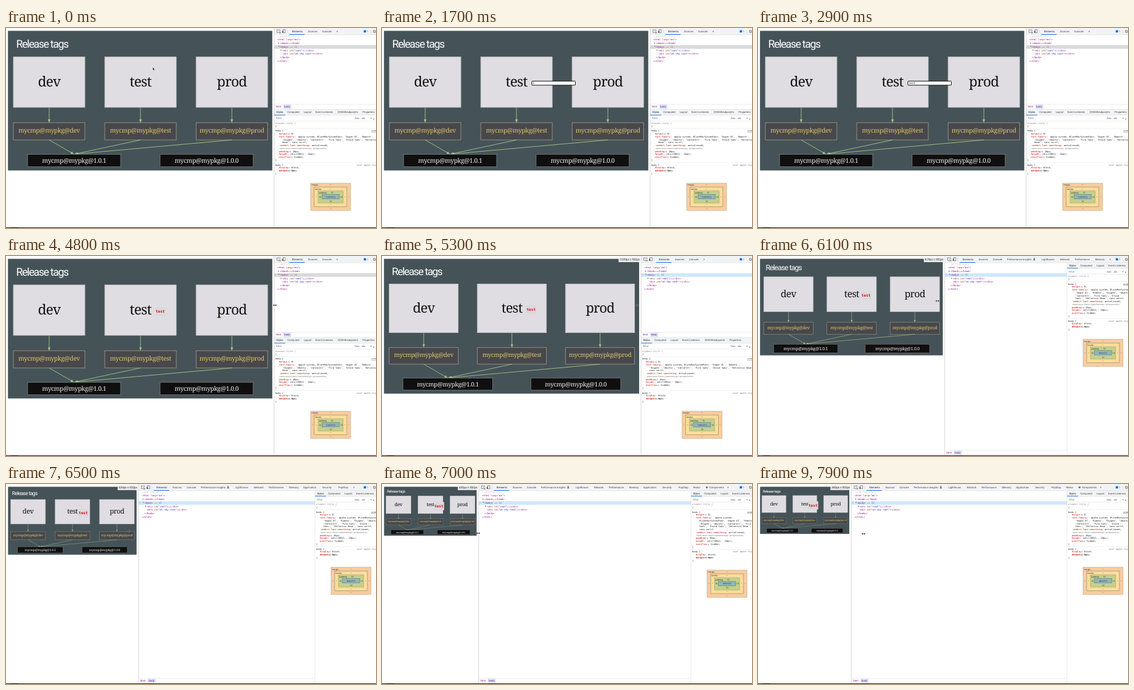
These frames come from a looping animation (600x325 px, 8 s). An HTML page:

```html
<!DOCTYPE html>
<html lang="en">
<head>
<meta charset="utf-8">
<title>Release tags</title>
<style>
html, body { margin: 0; width: 100%; height: 100%; overflow: hidden; background: #fff; }
svg { display: block; width: 600px; height: 325px; text-rendering: geometricPrecision; }
text { white-space: pre; }
.ui { font: 4.2px Roboto, sans-serif; fill: #444; }
.tree { font: 3.88px "DejaVu Sans Mono", monospace; fill: #881280; }
.css { font: 3.68px "DejaVu Sans Mono", monospace; fill: #222; }
.box { font: 3.5px Roboto, sans-serif; fill: #333; text-anchor: middle; }
.big { font: 500 22.6px "Noto Serif", serif; fill: #111; text-anchor: middle; letter-spacing: -.8px; }
.tag { font: 10.2px "Noto Serif", serif; text-anchor: middle; letter-spacing: -.35px; }
.title { font: 17.6px Roboto, sans-serif; fill: #fff; letter-spacing: -1.35px; }
.code { font: bold 6.1px "DejaVu Sans Mono", monospace; fill: #d3101c; }
</style>
</head>
<body>
<svg id="stage" viewBox="0 0 600 325"></svg>
<script>
const LOOP = 8000, STEP = 100, ZOOM = 0.3443;
const stage = document.getElementById('stage');

// time, divider x
const DIVIDER = [[5000, 434.8], [5300, 420], [5600, 393.6], [6100, 302.8], [6500, 215],
  [6800, 166], [7000, 156.8], [7500, 143], [7800, 145], [7900, 151.4]];
// time, pointer x, y
const POINTER = [[0, 238, 64], [200, 243.5, 89], [3600, 243.5, 89], [3800, 258, 87], [4100, 350, 80],
  [4300, 437, 78], [4400, 447, 79], [4500, 436, 80], [5000, 436, 80], [5300, 414, 80], [5600, 384, 80],
  [6100, 291, 73], [6500, 200, 77], [6800, 161, 80], [7000, 156, 80], [7500, 142, 80], [7800, 152, 81], [7900, 171, 81]];
// label, x from the divider, width
const TABS = [['Elements', 29, 18], ['Sources', 55, 15], ['Console', 78, 15], ['Performance insights', 101, 46],
  ['Lighthouse', 157, 21], ['Network', 187, 15], ['Performance', 211, 24], ['Memory', 244, 15],
  ['Application', 267, 22], ['Security', 298, 17], ['PopStop', 324, 16], ['Redux', 348, 12], ['Components', 374, 24]];
const SIDE_TABS = [['Styles', 3.5], ['Computed', 21.5], ['Layout', 48], ['Event Listeners', 67],
  ['DOM Breakpoints', 103.5], ['Properties', 143.5], ['Accessibility', 170]];
const TREE = [[5.3, '<html lang="en">'], [9.3, '<head>…</head>', '▸'], [9.3, '<body>', '▾'],
  [13.4, '<div id="root">…</div>', '▸'], [13.4, '<div id="wt-sky-root"></div>'], [9.3, '</body>'], [5.3, '</html>']];
const FAMILY = "-apple-system, BlinkMacSystemFont, 'Segoe UI', 'Roboto', 'Oxygen', 'Ubuntu', " +
  "'Cantarell', 'Fira Sans', 'Droid Sans', 'Helvetica Neue', sans-serif;";

function at(keys, t) {
  let i = keys.findIndex(k => k[0] > t);
  if (i < 0) return keys[keys.length - 1].slice(1);
  if (i === 0) return keys[0].slice(1);
  const a = keys[i - 1], b = keys[i], u = (t - a[0]) / (b[0] - a[0]);
  return a.slice(1).map((v, j) => v + (b[j + 1] - v) * u);
}

const esc = s => String(s).replace(/&/g, '&amp;').replace(/</g, '&lt;');
const rect = (x, y, w, h, fill, more = '') => `<rect x="${x}" y="${y}" width="${w}" height="${h}" fill="${fill}" ${more}/>`;
const raw = (cls, x, y, body, more = '') => `<text class="${cls}" x="${x}" y="${y}" ${more}>${body}</text>`;
const text = (cls, x, y, s, more) => raw(cls, x, y, esc(s), more);
const span = (s, fill, more = '') => `<tspan fill="${fill}" ${more}>${esc(s)}</tspan>`;
const line = (x1, y1, x2, y2, color = '#ccc', w = 0.4) =>
  `<path d="M${x1} ${y1}L${x2} ${y2}" stroke="${color}" stroke-width="${w}" fill="none"/>`;

function arrow(x1, y1, x2, y2) {
  const a = Math.atan2(y2 - y1, x2 - x1) * 180 / Math.PI;
  return line(x1, y1, x2, y2, '#a5c48d', 0.9) +
    `<path transform="translate(${x2} ${y2}) rotate(${a})" d="M0 0L-5 -2.2V2.2Z" fill="#a5c48d"/>`;
}

function slide(scale) {
  let s = rect(3.2, 4.6, 428.8, 227, '#455358') + text('title', 16.5, 32, 'Release tags');
  ['dev', 'test', 'prod'].forEach((name, i) => {
    const x = 12 + i * 148.2, mid = x + 58;
    s += rect(x, 47, 116, 82, '#dfdde1', 'stroke="#c4c8c9" stroke-width=".8"') + text('big', mid, 95, name);
    s += rect(x, 154, 116, 28, '#47484b', 'stroke="#a79b8d" stroke-width=".8"');
    s += text('tag', mid, 170, 'mycmp@mypkg@' + name, 'fill="#dfc36c"');
    s += arrow(mid, 129.5, mid, 153.5) + arrow(mid, 182, 110 + i, 205);
  });
  [35, 250].forEach((x, i) => {
    s += rect(x, 205.3, 151, 20.4, '#0f0f10', `stroke="${i ? '#8f7775' : '#7d8587'}" stroke-width=".8"`);
    s += text('tag', x + 75.5, 219.5, 'mycmp@mypkg@1.0.' + (1 - i), 'fill="#eee"');
  });
  return `<g transform="translate(3.4 4.4) scale(${scale}) translate(-3.4 -4.4)">${s}</g>`;
}

function toolbar(x) {
  let s = rect(x, 0, 600 - x, 11, '#f1f3f4') + line(x, 11, 600, 11);
  s += `<path d="M${x + 8} 7.5h-3.4v-4.6h5v2M${x + 7} 4.8l3.2 3.4m0-2.4v2.4h-2.4" fill="none" stroke="#555" stroke-width=".6"/>`;
  s += rect(x + 14.5, 2.8, 3.6, 5, 'none', 'stroke="#555" stroke-width=".6"') + rect(x + 13, 4.4, 2, 3.6, '#666');
  s += line(x + 21.5, 2.5, x + 21.5, 8.5);
  let more = x + 403;
  for (const [name, dx, w] of TABS) {
    if (x + dx + w > 566) { more = x + dx; break; }
    s += text('ui', x + dx, 7, name, dx === 29 ? 'style="fill:#222"' : '');
    if (name === 'Performance insights') s += `<path d="M${x + dx + 42.3} 7.2l1-3v-1.2h1.6v1.2l1 3z" fill="#777"/>`;
    if (name === 'Components') s += `<circle cx="${x + dx - 4}" cy="5.5" r="1.7" fill="#777"/>`;
  }
  s += text('ui', more, 7.2, '»', 'style="font-size:5.5px"') + rect(x + 24.5, 10, 25, 1, '#1a73e8');
  s += rect(580, 3.6, 4, 3.6, '#1a73e8', 'rx=".5"') + text('ui', 585.2, 7, '1', 'style="fill:#1a73e8"');
  s += line(591.5, 2.5, 591.5, 8.5);
  return s + '<circle cx="597.5" cy="5.5" r="1.7" fill="none" stroke="#555" stroke-width="1.1" stroke-dasharray=".9 .3"/>';
}

function tree(x, end, active) {
  let s = rect(x, 27.9, end - x, 5.9, active ? '#cfe8fc' : '#dadada');
  s += text('tree', x + 5.3, 14.6, '<!DOCTYPE html>', 'style="fill:#ccc"');
  TREE.forEach(([dx, code, mark], i) => {
    const y = 20.2 + i * 5.8;
    let body = esc(code).replace(/(\w+)=("[^"]*")/, (m, k, v) => span(k, '#994500') + '=' + span(v, '#1a1aa6'));
    if (mark === '▾') {
      body += span(' == $0', '#888', 'font-style="italic"');
      s += text('tree', x + 1.4, y - 0.3, '⋯', 'style="fill:#777"');
    }
    if (mark) {
      const d = mark === '▾' ? 'h2.2l-1.1 1.8z' : 'v2.4l1.8-1.2z';
      s += `<path d="M${x + dx - 2.8} ${y - 2.5}${d}" fill="#666"/>`;
    }
    s += raw('tree', x + dx, y, body);
  });
  return rect(x, 11, end - x, 4.6, '#fff') + s;
}

function crumbs(x, y, end) {
  return line(x, y - 4, end, y - 4) + rect(x + 15, y - 3.8, 12.8, 7.4, '#d5e4f7') +
    text('ui', x + 2.8, y + 1.3, 'html', 'style="fill:#881280"') + text('ui', x + 16.5, y + 1.3, 'body', 'style="fill:#881280"');
}

function wrap(words, limit) {
  const rows = [];
  let row = 'font-family:';
  for (const w of words) {
    if (row.length + w.length + 1 > limit) { rows.push(row); row = w; } else row += ' ' + w;
  }
  return [...rows, row];
}

function familyRows(left, wide, settled) {
  if (!wide) return wrap(FAMILY.split(' '), Math.floor((604 - left) / 2.25));
  const breaks = settled ? ['Blink', "'Oxygen", "Sans', 'Droid", 'sans-serif'] : ["'Segoe", "'Cantarell", "Sans', 'Helv"];
  let rest = 'font-family: ' + FAMILY;
  const rows = breaks.map(b => {
    const i = rest.indexOf(b), row = rest.slice(0, i).trimEnd();
    rest = rest.slice(i);
    return row;
  });
  return [...rows, rest];
}

function prop(x, y, name, value, state) {
  const off = state ? 'text-decoration="line-through"' : '';
  const sep = value[0] === '▸' ? ':' : ': ';
  return raw('css', x, y, span(name, state === 'bad' ? '#999' : '#c80000', off) +
    span(sep + value, state === 'bad' ? '#999' : '#222', off));
}

function boxModel(cx, y, size) {
  const layers = [[65, 44.5, '#f9cc9d', 'margin', '–'], [53, 32, '#fddd9b', 'border', '–'], [41, 20, '#c3d08b', 'padding', '10']];
  let s = '';
  layers.forEach(([w, h, fill, name, v], i) => {
    const top = y + i * 6.2, left = cx - w / 2;
    s += rect(left, top, w, h, fill, `stroke="#555" stroke-width=".4" ${i === 1 ? '' : 'stroke-dasharray="1 .7"'}`);
    s += text('box', left + 1.5, top + 4.4, name, 'style="text-anchor:start"');
    s += text('box', cx + (i === 2 ? 2 : 0), top + 4.4, v) + text('box', cx, top + h - 1.8, v);
    s += text('box', left + 3.2, y + 23.6, v) + text('box', left + w - 3.2, y + 23.6, v);
  });
  return s + rect(cx - 14, y + 18.6, 28, 7.2, '#8cb6c0', 'stroke="#555" stroke-width=".4"') +
    text('box', cx, y + 23.5, size);
}

function styles(x, top, wide, settled, size) {
  const right = 600, w = right - x, pitch = 4.74;
  let s = rect(x, top, w, 324 - top, '#fff') + rect(x, top, w, 9.6, '#f1f3f4');
  s += line(x, top, right, top) + line(x, top + 9.6, right, top + 9.6);
  for (const [name, dx] of SIDE_TABS) {
    if (x + dx + name.length * 1.9 > 600) break;
    s += text('ui', x + dx, top + 6.2, name, dx < 4 ? 'style="fill:#222"' : '');
  }
  s += rect(x, top + 8.8, 18, 0.9, '#1a73e8');
  s += text('ui', x + 3, top + 16, 'Filter', 'style="fill:#777"') + line(x, top + 19, right, top + 19);
  s += text('ui', 565.3, top + 16, ':hov') + text('ui', 576, top + 16, '.cls') + text('ui', 590.8, top + 16, '+');
  s += `<path d="M597 ${top + 16.6}v-2l-2 2z" fill="#666"/>`;

  let y = top + 23.6;
  const px = x + 8, name = x + 2;
  const next = () => (y += pitch);
  const gap = () => { s += line(x, y + 2.8, right, y + 2.8, '#ddd'); y += 7.8; };
  s += text('css', name, y, 'element.style {', 'style="fill:#888"') + text('css', name, next(), '}');
  gap();
  s += text('css', name, y, 'body {') + text('css', 592, y, 'index.css:1', 'text-decoration="underline" style="fill:#555"');
  s += prop(px, next(), 'margin', '▸ 0;');
  familyRows(px, wide, settled).forEach((row, i) => {
    s += i ? text('css', px + 5.5, next(), row) : prop(px, next(), 'font-family', row.slice(13));
  });
  s += prop(px, next(), '-webkit-font-smoothing', 'antialiased;');
  s += prop(px, next(), '-moz-osx-font-smoothing', 'grayscale;', 'bad');
  s += prop(px, next(), 'padding', '▸ 10px;');
  s += prop(px, next(), 'height', 'calc(100vh - 20px);');
  s += prop(px, next(), 'overflow', '▸ hidden;') + text('css', name, next(), '}');
  gap();
  s += text('css', name, y, 'body {') + text('css', 569, y, 'user agent stylesheet', 'font-style="italic" style="fill:#777"');
  s += prop(px, next(), 'display', 'block;') + prop(px, next(), 'margin', '▸ 8px;', 'off') + text('css', name, next(), '}');
  return s + boxModel((x + right) / 2 + 9, y + 14.3, size);
}

function overlay(t, w) {
  const h = w * 0.531;
  if (t >= 3200) {
    const x = 0.568 * w - 1.2, y = 6.6 + 0.367 * h;
    return rect(x, y - 6.7, 16.8, 13.4, '#dcd8db', 'rx="1"') + text('code', x + 1, y + 2.1, 'test');
  }
  if (t < 400) return '';
  const typed = 'test'.slice(0, [1700, 1800, 2200, 2300].filter(k => t >= k).length);
  return rect(243, 86.3, 70.5, 6.6, '#fff', `rx="1" stroke="#111" stroke-width="${t < 600 ? 0.6 : 1}"`) +
    text('css', 244.4, 91, typed, 'style="font-size:4.5px"') +
    (t >= 2300 && t < 2900 ? line(255.6, 87.6, 255.6, 91.8, '#222') : '');
}

function pointer(t) {
  if (t >= 500 && t < 3700) return '';
  const [x, y] = at(POINTER, t);
  const d = t < 4700 ? 'M0 0V4.6L1.1 3.6L1.9 5.3L2.7 4.9L1.9 3.3H3.3Z'
    : 'M-3.2 0L-1.2 -1.7V-.5H1.2V-1.7L3.2 0L1.2 1.7V.5H-1.2V1.7Z';
  return `<path transform="translate(${x} ${y})" d="${d}" fill="#111" stroke="#fff" stroke-width=".3"/>`;
}

function render(t) {
  const [edge] = at(DIVIDER, t), dragging = t >= 5100;
  // the panel contents trail the divider while it is dragged
  const lag = dragging && (t / STEP) % 4 === 0 ? 3 : 0;
  const x = edge - lag, wide = edge < 366, end = wide ? 501 : 600;
  const w = edge - 6.9, px = Math.round(edge / ZOOM);
  let s = tree(x, end, dragging) + toolbar(x) + crumbs(x, wide ? 320 : 128, end);
  s += styles(wide ? 501 : x, wide ? 10.5 : 132.2, wide, t >= 6700 && t < 7400, `${px - 20}×912`);
  if (wide) s += line(501, 11, 501, 324);
  s += rect(0, 0, edge, 325, '#fff') + line(edge, 0, edge, 324, '#bbb', 0.6);
  s += slide(w / 428.1) + overlay(t, w);
  if (dragging) {
    const lw = px > 999 ? 36.5 : 34;
    s += rect(edge - lw, 0.6, lw, 9.4, '#f4f4f4', 'opacity=".9"') +
      text('ui', edge - lw / 2, 7, `${px}px × 932px`, 'text-anchor="middle" style="font-size:4.6px;fill:#333"');
  }
  s += rect(0, 324, 600, 1, '#33102c') + rect(8, 323.4, 12, 0.6, '#aaa');
  stage.innerHTML = s + pointer(t);
}

const start = performance.now();
let shown = -1;
function tick() {
  const t = Math.floor((performance.now() - start) % LOOP / STEP) * STEP;
  if (t !== shown) render(shown = t);
  requestAnimationFrame(tick);
}
tick();
</script>
</body>
</html>
```
